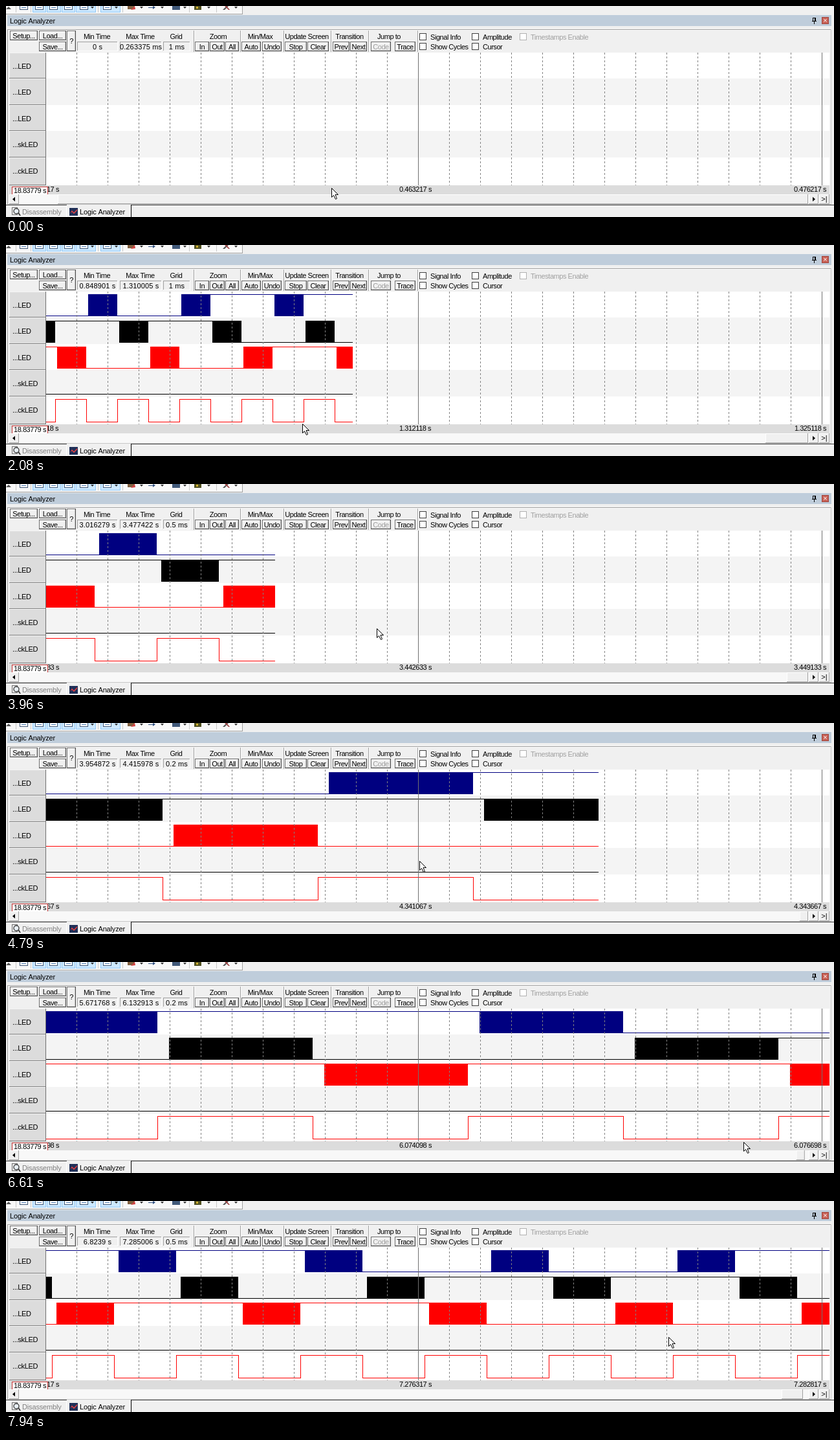
These frames come from a looping animation (1280 by 326 pixels, 8 s). An HTML page with a canvas:

```html
<!DOCTYPE html>
<html lang="en">
<head>
<meta charset="utf-8">
<title>Logic Analyzer</title>
<style>
html, body { margin: 0; width: 100%; height: 100%; overflow: hidden; background: #f0f0f0; }
canvas { display: block; }
</style>
</head>
<body>
<canvas id="stage" width="1280" height="326"></canvas>
<script>
const c = document.getElementById('stage').getContext('2d');
const LOOP = 8000, LEFT = 61, RIGHT = 1273, MID = 637, CELL = 48;
const PHASE = 0.4205, SWITCH = 0.0733; // tick offset and task start delay, ms

// Screen refreshes: start, interval, last refresh
const REFRESH = [[1000, 100, 1800], [1870, 70, 2080], [2210, 70, 4240], [4370, 70, 7940]];
// time, max time, shown span, view centre, end of trace (all ms), right edge of scroll thumb
const VIEW = [
  [930, 0, 461.1, 2, 0, 1240],
  [2080, 1310.005, 461.104, 1312.118, 1310.005, 1240],
  [3120, 2527.559, 461.181, 2533.375, 2527.559, 1240],
  [4790, 4415.978, 461.106, 4341.067, 4342.229, 1240],
  [5980, 5525.526, 461.181, 5524.286, 5525.526, 1240],
  [7310, 6807.787, 461.104, 6685, 6695, 1229],
  [7940, 7285.006, 461.106, 7276.317, 7285.006, 1232]
];
const ZOOM = [[0, 1], [2350, 2], [3610, 1], [3820, 0.5], [4030, 0.2], [7520, 0.5]];
const POINTER = [
  [1300, 120, 160], [2080, 458, 276], [3120, 506, 234], [4790, 639, 213], [5210, 639, 213],
  [5980, 1197, 301], [6120, 1190, 304], [7310, 1069, 242], [7940, 1024, 210]
];
// colour, top, bottom, slot in the round robin, shift of the level cycle
const TASKS = [['#000080', 76, 109, 2, 2], ['#000', 117, 150, 0, 1], ['#f00', 157, 190, 1, 3]];
const ROWS = [72, 112, 153, 193, 234, 277];
const NAMES = ['...LED', '...LED', '...LED', '...skLED', '...ckLED'];

function rect(x, y, w, h, color) {
  c.fillStyle = color;
  c.fillRect(x, y, w, h);
}

function frame(x, y, w, h, light, dark = light) {
  rect(x, y, w, 1, light);
  rect(x, y, 1, h, light);
  rect(x, y + h - 1, w, 1, dark);
  rect(x + w - 1, y, 1, h, dark);
}

function text(s, x, y, align = 'left', color = '#000', spacing = -0.45) {
  c.font = '11px "Liberation Sans", Arial, sans-serif';
  c.letterSpacing = spacing + 'px';
  c.textAlign = align;
  c.fillStyle = color;
  c.fillText(s, x, y);
}

function poly(points, fill, stroke) {
  c.beginPath();
  points.forEach(([x, y]) => c.lineTo(x, y));
  c.closePath();
  c.fillStyle = fill;
  c.fill();
  if (stroke) {
    c.strokeStyle = stroke;
    c.lineWidth = 1;
    c.stroke();
  }
}

function button(s, x, y, w, h = 15, color = '#000') {
  rect(x, y, w, h, '#f0f0f0');
  frame(x, y, w, h, '#696969', '#505050');
  frame(x + 1, y + 1, w - 2, h - 2, '#fff', '#c4c4c4');
  text(s, x + w / 2, y + h / 2 + 4, 'center', color);
}

function field(title, value, x, w) {
  text(title, x + w / 2 - 1, 51, 'center');
  frame(x, 55, w, 15, '#a0a0a0', '#fff');
  text(value, x + w / 2, 67, 'center', '#000', 0.15);
}

function checkbox(s, x, y, color = '#000') {
  rect(x, y, 11, 11, '#fff');
  frame(x, y, 11, 11, color === '#000' ? '#404040' : '#b0b0b0');
  text(s, x + 17, y + 10, 'left', color);
}

const seconds = ms => +(ms / 1000).toFixed(6) + ' s';

function lerpRow(rows, t) {
  const i = Math.max(1, rows.findIndex(r => r[0] >= t));
  const [a, b] = t >= rows.at(-1)[0] ? [rows.at(-1), rows.at(-1)] : [rows[i - 1], rows[i]];
  const f = b[0] > a[0] ? Math.max(0, (t - a[0]) / (b[0] - a[0])) : 0;
  return a.map((v, n) => v + (b[n] - v) * f);
}

function refreshTime(t) {
  const r = REFRESH.findLast(([start]) => t >= start);
  return r ? Math.min(r[2], t - (t - r[0]) % r[1]) : 0;
}

function viewAt(t) {
  if (!t) return { min: '0 s', max: '0.263375 ms', grid: 1, mid: 463.217, end: 0, thumb: [80, 1240] };
  const [, max, span, mid, end, edge] = lerpRow(VIEW, t);
  const grid = ZOOM.findLast(([start]) => t >= start)[1];
  return {
    min: seconds(Math.max(0, max - span)), max: seconds(max), grid, mid, end,
    thumb: [edge - Math.max(13, 66 * grid), edge]
  };
}

function drawTopStrip() {
  rect(0, 0, 1280, 326, '#f0f0f0');
  rect(0, 0, 365, 12, '#f8f8f8');
  rect(0, 12, 365, 1, '#a0a0a0');
  rect(365, 0, 1, 13, '#a0a0a0');
  for (const [x, w] of [[41, 21], [63, 22], [86, 21], [108, 31], [146, 31]]) {
    rect(x, 0, w, 10, '#cce8ff');
    frame(x, -1, w, 11, '#90c8f6');
  }
  for (const x of [15, 38, 142, 180, 283, 325]) rect(x, 0, 1, 10, '#c8c8c8');
  for (const x of [21, 45, 67, 90, 114, 150]) {
    rect(x, 0, 13, 6, '#fff');
    frame(x, -2, 13, 8, '#405878');
    rect(x + 3, 2, 7, 1, '#4878b0');
  }
  poly([[0, 5], [4, 1], [8, 5]], '#555');
  rect(188, 0, 11, 5, '#806040');
  poly([[193, 6], [199, 0], [200, 5]], '#d04040');
  rect(220, 2, 10, 1, '#305080');
  poly([[227, 0], [231, 2], [227, 5]], '#305080');
  rect(257, 0, 12, 6, '#405878');
  rect(291, 0, 11, 6, '#505020');
  rect(294, 1, 3, 3, '#d0b030');
  poly([[335, 6], [341, 0], [344, 0], [338, 6]], '#555');
  poly([[338, 0], [341, 0], [346, 6], [344, 6]], '#a04040');
  for (const x of [131, 168, 207, 239, 274, 311, 353]) poly([[x, 1], [x + 5, 1], [x + 2.5, 4]], '#333');
}

function drawTitle() {
  rect(2, 14, 1274, 17, '#bfcddb');
  text('Logic Analyzer', 6, 27, 'left', '#000', -0.15);
  rect(1247, 18, 5, 5, '#000');
  rect(1248, 19, 2, 4, '#bfcddb');
  rect(1246, 23, 7, 1, '#000');
  rect(1249, 24, 1, 4, '#000');
  rect(1261, 17, 11, 11, '#c86055');
  frame(1261, 17, 11, 11, '#a04840');
  text('×', 1266.5, 26, 'center', '#fff', 0);
}

function drawControls(v) {
  frame(2, 36, 1274, 271, '#a0a0a0', '#c8c8c8');
  rect(3, 37, 1272, 1, '#fff');
  button('Setup...', 6, 38, 43);
  button('Load...', 51, 38, 42);
  button('Save...', 51, 55, 42);
  button('?', 94, 38, 14, 32);
  field('Min Time', v.min, 110, 63);
  field('Max Time', v.max, 176, 65);
  field('Grid', v.grid + ' ms', 243, 42);
  for (const x of [290, 362, 429, 502, 560, 636]) {
    rect(x, 38, 1, 33, '#a0a0a0');
    rect(x + 1, 38, 1, 33, '#fff');
  }
  for (const [s, x] of [['Zoom', 328], ['Min/Max', 393], ['Update Screen', 465], ['Transition', 531], ['Jump to', 592]])
    text(s, x, 51, 'center');
  for (const [s, x, w] of [['In', 292, 22], ['Out', 315, 23], ['All', 339, 21], ['Auto', 364, 30], ['Undo', 396, 30],
    ['Stop', 431, 34], ['Clear', 466, 33], ['Prev', 505, 26], ['Next', 532, 26], ['Trace', 601, 32]])
    button(s, x, 55, w);
  button('Code', 564, 55, 31, 15, '#a0a0a0');
  checkbox('Signal Info', 639, 42);
  checkbox('Amplitude', 720, 42);
  checkbox('Timestamps Enable', 794, 42, '#a0a0a0');
  checkbox('Show Cycles', 639, 57);
  checkbox('Cursor', 720, 57);
}

function drawRows() {
  NAMES.forEach((name, i) => {
    const y = ROWS[i], h = ROWS[i + 1] - y;
    rect(LEFT, y, RIGHT - LEFT, h, i % 2 ? '#f4f4f4' : '#fff');
    rect(5, y, 56, h, '#dcdcdc');
    frame(5, y, 57, h, '#f4f4f4', '#808080');
    text(name, 10, y + 25, 'left', '#000', -0.3);
  });
}

function drawWaves(v) {
  const scale = CELL / v.grid;
  const px = ms => Math.round(MID + (ms - v.mid) * scale);
  const endX = Math.min(RIGHT, px(v.end));
  if (endX <= LEFT) return;

  // Draws the part of a span that lies inside the view
  const span = (a, b, y, h, color) => {
    const x0 = Math.max(LEFT, a), x1 = Math.min(endX, b);
    if (x1 > x0) rect(x0, y, x1 - x0, h, color);
  };
  const first = Math.max(0, Math.floor(v.mid - 13 * v.grid) - 5);
  const last = Math.ceil(v.mid + 14 * v.grid);
  for (let k = first; k <= last; k++) {
    const tick = k + PHASE, x = px(tick), next = px(tick + 1);
    for (const [color, top, bottom, slot, shift] of TASKS) {
      if (k % 3 !== slot) continue;
      const high = ((Math.floor(k / 3) - shift) & 3) < 2;
      span(px(tick + SWITCH), next, top, bottom - top + 1, color);
      span(next, px(tick + 3 + SWITCH), high ? top : bottom, 1, color);
    }
    span(x, next, k % 2 ? 273 : 238, 1, '#f00');
    span(x, x + 1, 238, 36, '#f00');
  }
  span(px(0), endX, 230, 1, '#000');
}

function drawGrid() {
  for (let x = LEFT; x < RIGHT; x += CELL) {
    if ([LEFT, MID, 1261].includes(x)) rect(x, 72, 1, 205, '#707070');
    else for (let y = 72; y < 277; y += 6) rect(x, y, 1, Math.min(3, 277 - y), '#808080');
  }
}

function drawFooter(v) {
  rect(5, 277, 1268, 14, '#dcdcdc');
  text(seconds(v.mid - 12 * v.grid), 32, 287);
  text(seconds(v.mid), 608, 287);
  text(seconds(v.mid + 13 * v.grid), 1268, 287, 'right');
  rect(9, 279, 56, 13, '#fff');
  frame(9, 279, 56, 13, '#c03030');
  text('18.83779 s', 12, 289);

  rect(5, 291, 1268, 15, '#f8f8f8');
  const [x0, x1] = v.thumb;
  for (const [x, w] of [[5, 15], [x0, x1 - x0], [1241, 15], [1257, 16]]) {
    rect(x, 291, w, 15, '#f0f0f0');
    frame(x, 291, w, 15, '#fff', '#a0a0a0');
  }
  poly([[14, 295], [14, 302], [10, 298.5]], '#000');
  poly([[1247, 295], [1247, 302], [1251, 298.5]], '#000');
  text('>|', 1265, 302, 'center', '#000', 0);
  if (x0 > 80) return;
  rect(5, 279, 4, 12, '#dcdcdc');
}

function drawTabs() {
  rect(0, 307, 1280, 19, '#f0f0f0');
  rect(0, 307, 94, 1, '#404040');
  rect(193, 307, 1087, 1, '#404040');
  rect(93, 308, 1, 18, '#fff');
  rect(193, 307, 1, 19, '#000');
  frame(9, 311, 9, 12, '#707070');
  c.beginPath();
  c.arc(16, 317, 4, 0, 7);
  c.fillStyle = '#e8f0f8';
  c.fill();
  c.strokeStyle = '#404040';
  c.lineWidth = 1.4;
  c.stroke();
  poly([[18, 320], [20, 319], [23, 324], [21, 324]], '#404040');
  text('Disassembly', 25, 322, 'left', '#808080', -0.15);
  rect(98, 312, 13, 12, '#203058');
  poly([[99, 320], [102, 316], [105, 319], [110, 314], [110, 316], [105, 321], [102, 318]], '#f04040');
  text('Logic Analyzer', 114, 322, 'left', '#000', -0.15);
}

function drawPointer(t, refresh) {
  if (t >= 140 && refresh < 1300) return;
  const [x, y] = t < 70 ? [503, 281] : t < 140 ? [2, 146] : lerpRow(POINTER, refresh).slice(1).map(Math.round);
  c.save();
  c.translate(x + 0.5, y + 0.5);
  poly([[0, 0], [0, 14], [3, 11], [6, 17], [8, 16], [5.5, 10], [10, 10]], '#fff', '#000');
  c.restore();
}

function draw(now) {
  const t = now % LOOP, refresh = refreshTime(t), view = viewAt(refresh);
  drawTopStrip();
  drawTitle();
  drawControls(view);
  drawRows();
  drawWaves(view);
  drawGrid();
  drawFooter(view);
  drawTabs();
  drawPointer(t, refresh);
}

const start = performance.now();
function tick() {
  draw(performance.now() - start);
  requestAnimationFrame(tick);
}
tick();
</script>
</body>
</html>
```
